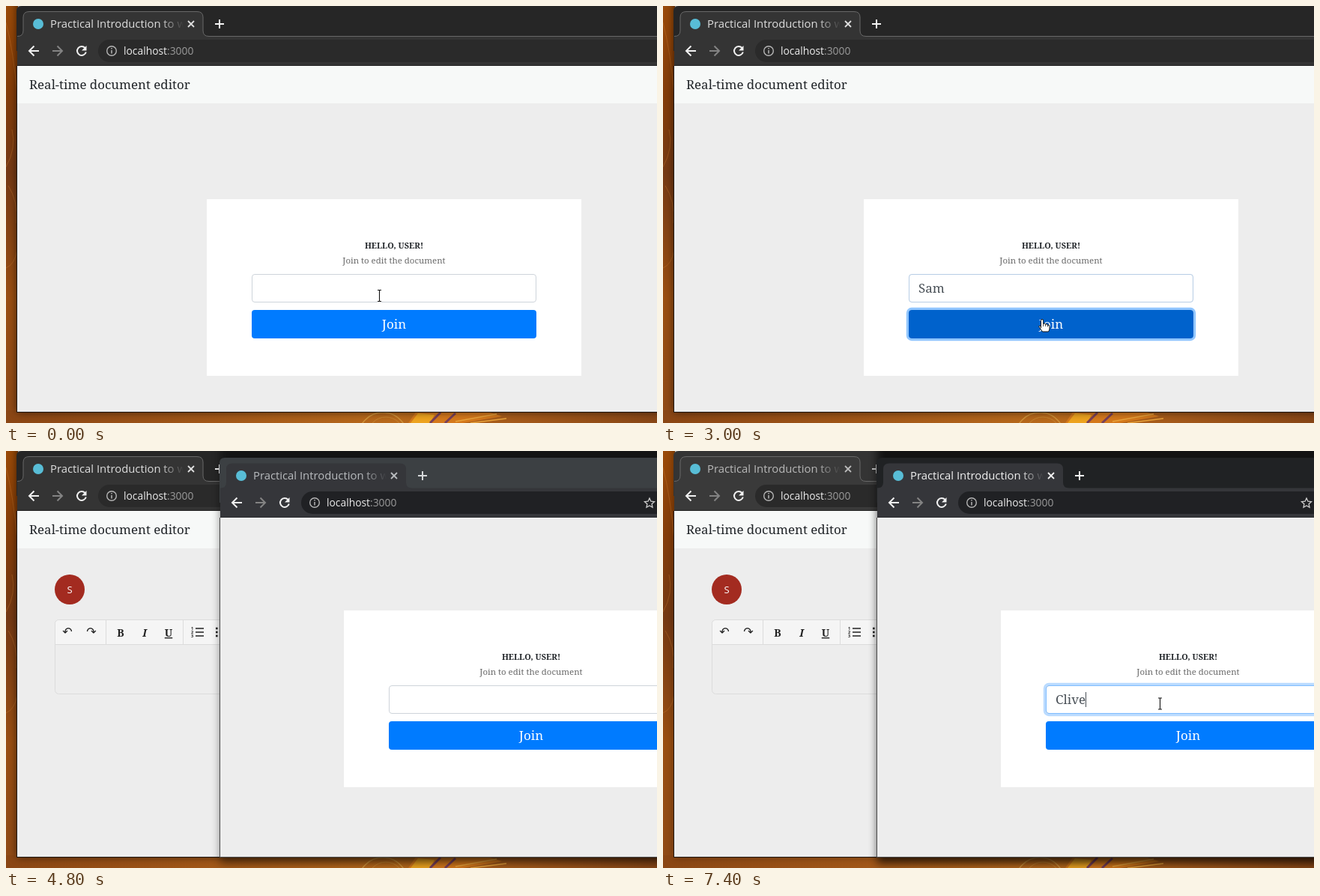
These frames come from a looping animation (869 by 557 pixels, 8 s). An HTML page:

```html
<!DOCTYPE html>
<html lang="en">
<head>
<meta charset="utf-8">
<title>Real-time document editor</title>
<style>
html, body { margin: 0; height: 100%; overflow: hidden; }
svg { display: block; width: 869px; height: 557px; }
text { font-family: "Noto Serif", serif; white-space: pre; }
.ui { font-family: "Open Sans", "Noto Sans", sans-serif; }
.sym { font-family: "DejaVu Sans", sans-serif; }
.mid { text-anchor: middle; }
</style>
</head>
<body>
<svg viewBox="0 0 869 557">
  <defs>
    <linearGradient id="side" x2="0" y2="1">
      <stop offset="0" stop-color="#9a4a08"/>
      <stop offset=".2" stop-color="#853d08"/>
      <stop offset=".4" stop-color="#763a14"/>
      <stop offset=".7" stop-color="#9a4f12"/>
      <stop offset="1" stop-color="#8f4a16"/>
    </linearGradient>
    <linearGradient id="base">
      <stop offset="0" stop-color="#8a4614"/>
      <stop offset=".3" stop-color="#a05618"/>
      <stop offset=".6" stop-color="#b96a1c"/>
      <stop offset=".8" stop-color="#a2581a"/>
      <stop offset="1" stop-color="#874616"/>
    </linearGradient>
    <linearGradient id="tail" gradientUnits="userSpaceOnUse" x1="206" x2="237" y1="0" y2="0">
      <stop offset="0" stop-color="#fff"/>
      <stop offset="1" stop-color="#000"/>
    </linearGradient>
    <mask id="fade" maskUnits="userSpaceOnUse" x="50" y="8" width="190" height="32">
      <rect x="50" y="8" width="190" height="32" fill="url(#tail)"/>
    </mask>
    <filter id="blur" x="-10%" y="-10%" width="120%" height="120%"><feGaussianBlur stdDeviation="6"/></filter>
  </defs>
  <g fill="none">
    <rect width="16" height="557" fill="url(#side)"/>
    <rect y="540" width="869" height="17" fill="url(#base)"/>
    <path d="M0 22Q10 60 15 120M0 215Q14 190 8 165M0 350Q12 345 15 325M3 240Q16 260 14 290" stroke="#c97a30" opacity=".4"/>
    <circle cx="503" cy="576" r="33" stroke="#d0943c" stroke-width="1.5"/>
    <circle cx="507" cy="573" r="24" stroke="#c58430"/>
    <path d="M537 557L548 541H640L662 548L610 557Z" fill="#d5791c"/>
    <path d="M540 557L550 544L572 546L566 557Z" fill="#eda31f"/>
    <path d="M566 557L580 543M586 557L600 544" stroke="#79405a" stroke-width="3"/>
    <path d="M600 555L655 545M620 557L668 551" stroke="#e9a33c" stroke-width="1.5"/>
  </g>
  <g id="scene"></g>
</svg>
<script>
const LOOP = 8000, STEP = 100;
const scene = document.getElementById('scene');
const pen = document.createElement('canvas').getContext('2d');
pen.font = '17px "Noto Serif", serif';

const rect = (x, y, w, h, fill, more = '') =>
  `<rect x="${x}" y="${y}" width="${w}" height="${h}" fill="${fill}" ${more}/>`;
const text = (x, y, size, fill, str, more = '') =>
  `<text x="${x}" y="${y}" font-size="${size}" fill="${fill}" ${more}>${str}</text>`;
const line = (d, color, width = 1, more = '') =>
  `<path d="${d}" fill="none" stroke="${color}" stroke-width="${width}" ${more}/>`;
const at = (x, y, body) => `<g transform="translate(${x} ${y})">${body}</g>`;
const ramp = (t, start, length) => Math.min(1, Math.max(0, (t - start) / length));
const latest = (t, steps) => steps.filter(s => s[0] <= t).pop()[1];
const caretOn = (t, spans) => spans.some(([a, b]) => t >= a && t < b);

// Browser frame with its top left corner at (15, 0)
function chrome(c) {
  const tab = 'M15 40.5Q23 40.5 23 33V15Q23 7.5 31 7.5H255Q263 7.5 263 15V33Q263 40.5 271 40.5H900';
  return rect(15, -20, 1000, 562, '#000', `filter="url(#blur)" opacity="${c.shadow}"`) +
    `<path d="M14 560V7Q14 0 21 0H900V60H14Z" fill="${c.strip}"/>` +
    `<path d="${tab}V79H15Z" fill="${c.bar}"/>` +
    line(tab, c.edge) +
    rect(15, 41, 900, 39, c.bar) + rect(15, 79, 900, 1, c.rule) +
    '<circle cx="43" cy="24" r="7" fill="#58bdd6"/>' +
    text(59, 29, 14.85, c.title, 'Practical Introduction to w', 'class="ui" mask="url(#fade)"') +
    line('M243 20l8 8M251 20l-8 8', c.title, 1.8) +
    line('M279 24h12M285 18v12', c.plus, 2) +
    line('M44 60H31M37.5 53.5L31 60L37.5 66.5', '#f1f1f1', 2) +
    line('M62 60H75M68.500 53.5L75 60L68.500 66.5', '#838383', 2) +
    line('M105.500 56A6 6 0 1 0 106.800 61.500', '#f1f1f1', 2) +
    '<path d="M107.500 53V59.500H101Z" fill="#f1f1f1"/>' +
    rect(123, 45, 900, 30, c.field, 'rx="15"') +
    '<circle cx="141" cy="60" r="6.3" fill="none" stroke="#b5b5b5" stroke-width="1.4"/>' +
    line('M141 59v4.500M141 56v1.600', '#b5b5b5', 1.5) +
    text(157, 65, 13.85, '#ececec', 'localhost<tspan fill="#9b9b9b">:3000</tspan>', 'class="ui"');
}

function login({ name, caret, focus, border = focus, button = '#007bff', press = 0 }) {
  const ring = (y, power) => power
    ? rect(326.4, y - 1.6, 383.2, 41.2, 'none', `rx="5.5" stroke="#007bff" stroke-width="3.2" opacity="${.27 * power}"`) : '';
  const box = (color, more = '') => rect(328.5, 358.5, 379, 37, 'none', `rx="3.5" stroke="${color}" ${more}`);
  const end = Math.round(341 + pen.measureText(name).width);
  return rect(268, 258, 500, 236, '#fff') +
    text(518, 324, 10.9, '#212529', 'HELLO, USER!', 'class="mid" font-weight="700"') +
    text(518, 344, 11.45, '#6a6a6a', 'Join to edit the document', 'class="mid"') +
    ring(358, focus) + box('#ced4da') + box('#80bdff', `opacity="${border}"`) +
    text(341, 383, 17, '#495057', name) +
    (caret ? rect(end, 367, 1, 20, '#495057') : '') +
    ring(406, press * 1.6) + rect(328, 406, 380, 38, button, 'rx="4"') +
    text(518, 431, 17, '#fff', 'Join', 'class="mid"');
}

function editor() {
  const tool = (x, str, more) => text(x, 248, 14, '#222', str, `class="mid" ${more}`);
  const rows = [237, 242, 247];
  return '<circle cx="85" cy="185" r="20" fill="#a32b20"/>' +
    text(85, 190, 13, '#fff', 'S', 'class="mid ui"') +
    rect(65.5, 225.5, 590, 99, '#ededed', 'rx="5" stroke="#dcdcdc"') +
    '<path d="M66 258V231Q66 226 71 226H650Q655 226 655 231V258Z" fill="#f5f5f5"/>' +
    line('M66 258.5H655M133.5 226V258M236.5 226V258M307.5 226V258M410.5 226V258', '#dcdcdc') +
    text(82, 247, 16, '#222', '↶', 'class="sym mid"') +
    text(114, 247, 16, '#222', '↷', 'class="sym mid"') +
    tool(153, 'B', 'font-weight="700"') +
    tool(185, 'I', 'font-weight="700" font-style="italic"') +
    tool(217, 'U', 'font-weight="700" text-decoration="underline"') +
    rows.map((y, i) =>
      text(247, y + 2, 5.5, '#222', i + 1, 'class="ui" font-weight="700"') +
      line(`M253 ${y}H264M285 ${y}H296`, '#222', 1.6) +
      rect(280, y - 1.3, 2.6, 2.6, '#222')).join('') +
    at(327, 242.5, '<g transform="rotate(-45)" fill="none" stroke="#a5a5a5" stroke-width="2">' +
      '<rect x="-9.500" y="-3.500" width="10.500" height="7" rx="3.5"/>' +
      '<rect x="-1" y="-3.500" width="10.500" height="7" rx="3.5"/></g>') +
    text(352, 248, 15, '#222', 'T<tspan font-size="8" dy="1">x</tspan>') +
    line('M357 249.5H366', '#222') +
    text(391, 249, 18, '#222', '&lt;/&gt;', 'class="mid"') +
    rect(414.5, 230.5, 102, 23, '#fff', 'stroke="#767676" rx="1"') +
    text(419, 248, 16.8, '#000', 'Styles') +
    line('M504 240l4 4l4-4', '#000', 2) +
    rect(671.5, 225.5, 400, 400, '#fff', 'stroke="#c8c8c8"') +
    text(681, 248, 12.45, '#555', 'Sam joined to edit the document');
}

const ibeam = (() => {
  const d = 'M-2.500-7.500h5M0-7.500v15M-2.500 7.500h5';
  return line(d, '#fff', 2.6) + line(d, '#111', 1.1);
})();
const arrow = '<path d="M0 0V16L3.800 12.500L6.500 18.500L9 17.400L6.400 11.500H11.500Z" fill="#1a1a1a" stroke="#fff"/>';
const hand = '<path d="M-4.500 3V-6.500Q-4.500-8.500-3-8.500Q-1.300-8.500-1.300-6.500V-2.500Q1-3.600 1.700-2Q4-2.800 4.500-1Q7-1.500 7 1.500V4Q7 6 5.500 8H-2.500Q-4.500 5-7.300 1Q-7.300-1-4.500 1Z" fill="#fff" stroke="#111"/>' +
  line('M-1.300-2.500V1M1.700-2V1M4.500-1V1.500', '#111', .8);

function pointer(t) {
  if (t < 300) return at(498.5, 387, ibeam);
  if (t < 2600) return at(t < 400 ? 497.5 : 496.5, 387, ibeam);
  if (t < 2700) return at(507, 421, hand);
  if (t < 3100) return at(509, 427, hand);
  if (t < 4300) return at(504.5, 421, arrow);
  if (t < 4500) return at(764.5, 376.5, arrow);
  return t < 5200 ? '' : at(663.5, 337.5, ibeam);
}

function firstLogin(t) {
  const leave = ramp(t, 2800, 200);
  return login({
    name: latest(t, [[0, ''], [1200, 'S'], [1500, 'Sa'], [1700, 'Sam']]),
    caret: caretOn(t, [[400, 900], [1200, 2400]]),
    focus: ramp(t, 300, 250) * (1 - leave),
    border: ramp(t, 300, 250) * (1 - leave * .7),
    button: latest(t, [[0, '#007bff'], [2600, '#0071ea'], [2700, '#0069d9'], [2900, '#0062cc']]),
    press: leave
  });
}

function secondLogin(t) {
  return login({
    name: latest(t, [[0, ''], [6200, 'C'], [6600, 'Cl'], [6900, 'Cli'], [7400, 'Clive']]),
    caret: caretOn(t, [[5300, 6000], [6200, LOOP]]),
    focus: ramp(t, 5200, 250)
  });
}

function draw(t) {
  const switched = t >= 5000;
  const back = switched
    ? { shadow: .4, strip: '#343434', bar: '#3a3a3a', title: '#b9b9b9', plus: '#c8c8c8' }
    : { shadow: .65, strip: '#262626', bar: '#343434', title: '#dedede', plus: '#f4f4f4' };
  const front = switched
    ? { shadow: .65, strip: '#202224', title: '#f1f1f1', plus: '#f1f1f1' }
    : { shadow: .45, strip: '#3c4043', title: '#b9bcbf', plus: '#d5d7d9' };

  let out = chrome({ ...back, edge: '#686868', rule: '#202020', field: '#2a2a2a' }) +
    rect(14, 80, 900, 463, '#1f1712') +
    rect(15, 80, 900, 462, '#ededed') +
    rect(15, 80, 900, 50, '#f7f9f8') +
    text(31, 111, 16.9, '#212529', 'Real-time document editor') +
    '<svg width="869" height="542">' + (t < 3100 ? firstLogin(t) : editor()) + '</svg>';

  if (t >= 4800) {
    out += '<svg width="869" height="557">' +
      at(271, 9, chrome({ ...front, bar: '#35363a', edge: 'none', rule: '#2b2c2f', field: '#202124' })) +
      rect(285, 89, 700, 454, '#4a4a4a') + rect(286, 89, 700, 453, '#ededed') +
      line('M859 63l1.900 4.200 4.600.5-3.400 3.100.9 4.500-4-2.300-4 2.300.9-4.500-3.400-3.100 4.600-.5z', '#d0d0d0', 1.3) +
      at(183, -45, secondLogin(t)) + '</svg>' +
      rect(286, 543, 600, 20, 'url(#base)', 'opacity="0"');
  }
  return out + pointer(t);
}

let shown = -1;
function tick(now) {
  const t = Math.floor(now % LOOP / STEP) * STEP;
  if (t !== shown) scene.innerHTML = draw(shown = t);
  requestAnimationFrame(tick);
}
requestAnimationFrame(tick);
</script>
</body>
</html>
```
